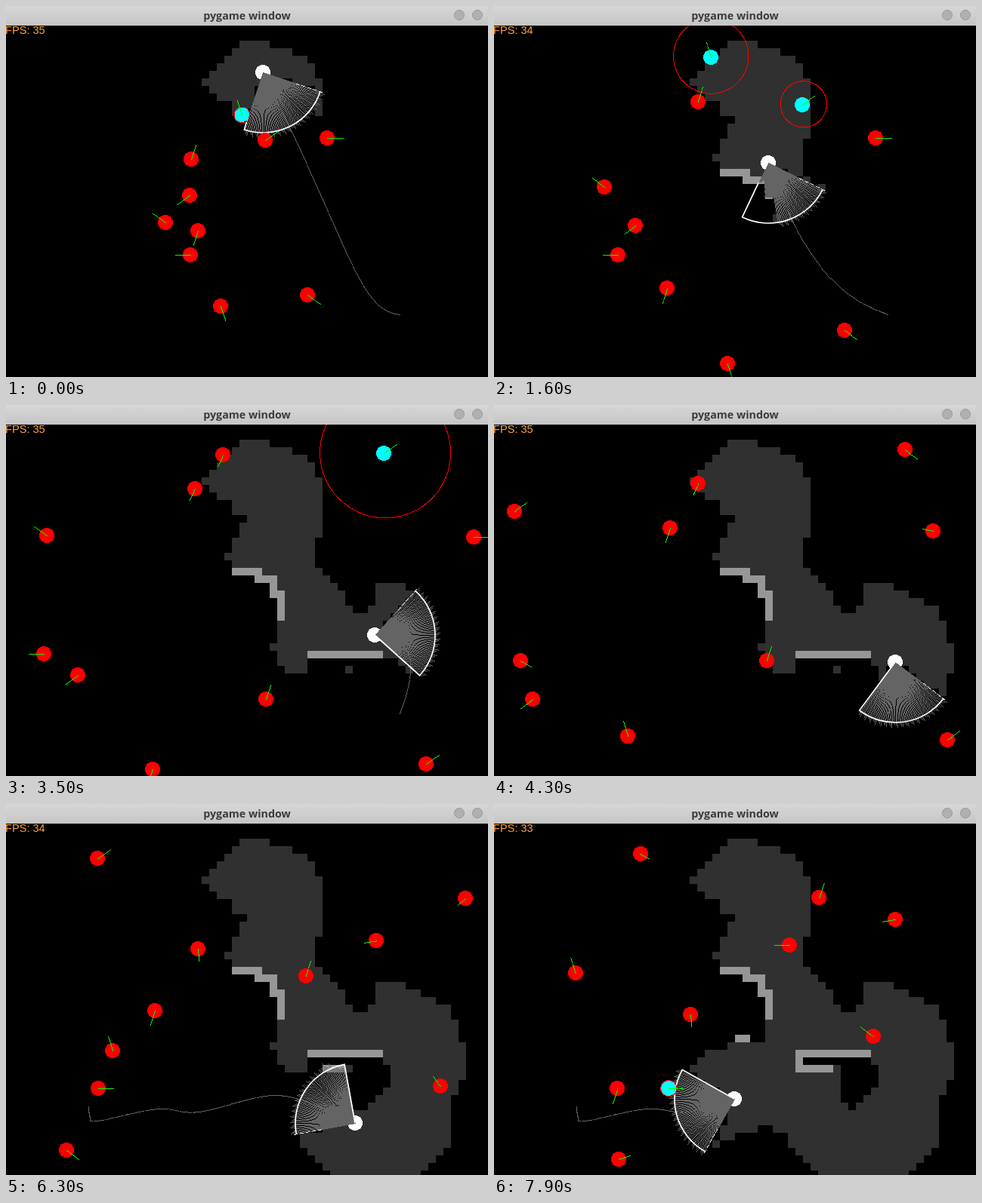
These frames come from a looping animation (638 px wide and 492 px high, 8000 ms). An HTML page with a canvas:

```html
<!DOCTYPE html>
<html lang="en">
<head>
<meta charset="utf-8">
<title>pygame window</title>
<style>
html, body { margin: 0; width: 100%; height: 100%; overflow: hidden; background: #000; }
canvas { position: absolute; left: 0; top: 0; }
#bar {
  position: absolute; left: 0; top: 0; width: 638px; height: 26px;
  background: linear-gradient(#d7d7d7, #c5c5c5);
  font: bold 14.3px/25px "Open Sans", "Noto Sans", sans-serif;
  color: #3c3c3c; text-align: center;
}
#bar i {
  position: absolute; top: 5px; width: 12px; height: 12px;
  border: 1px solid #989898; border-radius: 50%; background: #b0b0b0;
}
#fps {
  position: absolute; left: -1px; top: 24px; white-space: pre;
  font: 14.6px/16px "Liberation Sans", Arial, sans-serif; color: #ffa03c;
}
</style>
</head>
<body>
<canvas id="stage" width="638" height="492"></canvas>
<div id="bar">pygame window<i style="left:593px"></i><i style="left:617px"></i></div>
<div id="fps">FPS: 35</div>
<script>
const ctx = document.getElementById('stage').getContext('2d');
const label = document.getElementById('fps');
const STEP = 100, TICKS = 80, RANGE = 80, HALF = 45, RAYS = 72, RAD = Math.PI / 180;
const AREA = { left: 19, right: 619, top: 46, bottom: 486 };
const FPS = [35, 34, 35, 34, 33];

// Distance a full-speed ball has covered after each number of running ticks.
const PAUSES = [2, 9, 21, 26, 52, 53];
const TRAVEL = [[0, 0], [1, 2], [14, 80], [31, 194], [39, 248], [50, 316], [57, 365], [73, 474]];

// travel, x, y, heading in degrees
const ROBOT = [[0, 340, 88, 63.4], [40, 357, 146, 100], [80, 363, 208, 71], [137, 408, 278, 75],
  [170, 452, 298, 5], [194, 488, 305, -3], [248, 531, 341, 82], [297, 521, 405, 100],
  [316, 513, 425, 125], [365, 462, 423, 214.5], [420, 390, 391, 190], [474, 318, 391, 164.5]];
const GOAL = [521, 409];
const NEXT_ROUTE = [[109, 401], [111, 415], [121, 420], [200, 404], [255, 408], [358, 386], [440, 412], [508, 430]];

// Ball i sets off at 36 * i degrees; a turn gives travel, new heading and speed.
const BALLS = [
  { x: 425, y: 175, turns: [[194, 192, 0.72], [248, 171, 0.79], [414, 180, 1]] },
  { x: 399, y: 383, turns: [[273, -128, 0.77], [408, -143, 1]] },
  { x: 284, y: 398, turns: [] },
  { x: 254, y: 298, turns: [] },
  { x: 243, y: 251, turns: [[0, 144, 0.86], [80, 144, 1], [409, -16, 0.79]] },
  { x: 244, y: 330, turns: [[225, 30, 0.79], [343, 0, 1]], seen: 466, lost: 474 },
  { x: 211, y: 287, turns: [[409, 28, 0.64]] },
  { x: 312, y: 144, turns: [[103, 115, 0.79], [194, 108, 1]], seen: 0, lost: 0 },
  { x: 245, y: 203, turns: [[165, 114, 0.77], [309, 86, 0.8]] },
  { x: 343, y: 178, turns: [[342, 138, 0.67], [405, 170, 0.84]], seen: 8, lost: 39 }
];

// Obstacles on the 10 px grid: column, row, width, height.
const WALLS = [[30, 19, 4, 1], [33, 20, 3, 1], [35, 21, 1, 2], [36, 22, 1, 4],
  [40, 30, 10, 1], [40, 31, 1, 2], [41, 32, 4, 1], [32, 28, 2, 1]];

// Rough border of the mapped floor and of the gap inside it.
const BORDER = [[311, 44], [340, 46], [400, 70], [409, 92], [419, 106], [419, 176], [409, 178], [410, 212],
  [448, 250], [458, 276], [478, 276], [489, 250], [489, 236], [519, 236], [589, 271], [599, 300], [609, 340],
  [609, 366], [599, 368], [590, 398], [589, 446], [550, 493], [429, 493], [389, 456], [388, 436], [354, 428],
  [328, 437], [289, 457], [309, 422], [309, 386], [258, 358], [279, 326], [357, 314], [359, 246], [329, 222],
  [299, 216], [289, 200], [309, 170], [319, 150], [299, 144], [299, 126], [279, 123], [261, 105], [261, 97]];
const GAP = [[409, 336], [499, 336], [509, 346], [509, 366], [470, 408], [459, 386], [459, 356], [449, 346], [409, 346]];

function lerp(table, k) {
  let i = 1;
  while (i < table.length - 1 && table[i][0] < k) i++;
  const a = table[i - 1], b = table[i], u = (k - a[0]) / (b[0] - a[0]);
  return a.slice(1).map((v, j) => v + (b[j + 1] - v) * u);
}

const travelAt = tick => lerp(TRAVEL, tick - PAUSES.filter(p => p <= tick).length)[0];
const polar = (x, y, angle, r) => [x + Math.cos(angle) * r, y + Math.sin(angle) * r];

// --- Map ---

const solid = new Set();
for (const [col, row, w, h] of WALLS) {
  for (let i = 0; i < w * h; i++) solid.add((row + Math.floor(i / w)) * 100 + col + i % w);
}

// How far the scanner reaches in one direction.
function reach(x, y, angle) {
  for (let r = 10; r < RANGE; r += 3) {
    const [px, py] = polar(x, y, angle, r);
    if (solid.has(Math.floor((py - 26) / 10) * 100 + Math.floor((px + 1) / 10))) return r + 5;
  }
  return RANGE;
}

function sees([x, y, heading], cx, cy) {
  const angle = Math.atan2(cy - y, cx - x), dist = Math.hypot(cx - x, cy - y);
  const turn = ((angle / RAD - heading) % 360 + 540) % 360 - 180;
  return Math.abs(turn) < HALF && dist < RANGE + 5 && dist <= reach(x, y, angle) + 5;
}

const poses = Array.from({ length: TICKS }, (_, tick) => lerp(ROBOT, travelAt(tick)));

// Walls show when hit, floor when it leaves the view, missed cells when the robot is closest.
function revealTick(cx, cy, wall) {
  const away = tick => Math.hypot(cx - poses[tick][0], cy - poses[tick][1]);
  let before = sees(poses[0], cx, cy), nearest = 0;
  if (!before && cy < 146 && away(0) < RANGE + 15) return 0;
  for (let tick = 1; tick < TICKS; tick++) {
    const now = sees(poses[tick], cx, cy);
    if (wall ? now : before && !now) return tick;
    before = now;
    if (away(tick) < away(nearest)) nearest = tick;
  }
  return before ? TICKS : nearest;
}

const floor = new Path2D();
for (const shape of [BORDER, GAP]) {
  shape.forEach((p, i) => i ? floor.lineTo(...p) : floor.moveTo(...p));
  floor.closePath();
}

const cells = [];
for (let row = 2; row < 47; row++) {
  for (let col = 25; col < 62; col++) {
    const x = col * 10 - 1, y = row * 10 + 26, wall = solid.has(row * 100 + col);
    if (wall || ctx.isPointInPath(floor, x + 5, y + 5, 'evenodd')) {
      cells.push({ x, y, wall, tick: revealTick(x + 5, y + 5, wall) });
    }
  }
}

// --- Crisp drawing ---

function line(color, [x0, y0], [x1, y1]) {
  const n = Math.max(1, Math.round(Math.max(Math.abs(x1 - x0), Math.abs(y1 - y0))));
  ctx.fillStyle = color;
  for (let i = 0; i <= n; i++) {
    ctx.fillRect(Math.round(x0 + (x1 - x0) * i / n), Math.round(y0 + (y1 - y0) * i / n), 1, 1);
  }
}

function disc(x, y, r, color) {
  ctx.fillStyle = color;
  for (let dy = -r; dy < r; dy++) {
    const half = Math.round(Math.sqrt(r * r - (dy + 0.5) ** 2));
    ctx.fillRect(Math.round(x) - half, Math.round(y) + dy, half * 2, 1);
  }
}

function ring(x, y, r, color) {
  ctx.fillStyle = color;
  for (let a = 0; a < 2 * Math.PI; a += 0.7 / r) {
    const [px, py] = polar(x, y, a, r);
    ctx.fillRect(Math.round(px), Math.round(py), 1, 1);
  }
}

// A cubic curve, drawn as short straight pieces.
function bezier(a, b, c, d) {
  const at = t => [0, 1].map(k => a[k] * (1 - t) ** 3 + 3 * b[k] * t * (1 - t) ** 2
    + 3 * c[k] * t * t * (1 - t) + d[k] * t ** 3);
  for (let i = 0; i < 20; i++) line('#646464', at(i / 20), at((i + 1) / 20));
}

function spline(pts) {
  const at = i => pts[Math.max(0, Math.min(pts.length - 1, i))];
  const offset = (p, from, to, k) => [p[0] + (to[0] - from[0]) * k, p[1] + (to[1] - from[1]) * k];
  for (let i = 0; i < pts.length - 1; i++) {
    const [a, b, c, d] = [at(i - 1), at(i), at(i + 1), at(i + 2)];
    bezier(b, offset(b, a, c, 1 / 6), offset(c, b, d, -1 / 6), c);
  }
}

// --- Scene ---

function drawRoute(s, [x, y, heading]) {
  if (s > 297) {
    spline([...NEXT_ROUTE.filter(p => p[0] < x - 15), [x, y]]);
    return;
  }
  // Leave along the heading and swing round towards the goal.
  const dist = Math.hypot(GOAL[0] - x, GOAL[1] - y);
  const arrive = Math.min(110, 5 + s * s * 0.0028) * RAD;
  bezier([x, y], polar(x, y, heading * RAD, dist * 0.7), polar(...GOAL, arrive, -dist * 0.15), GOAL);
}

function drawView(s, [x, y, heading]) {
  const low = (heading - HALF) * RAD, high = (heading + HALF) * RAD;
  for (let i = 0; i <= RAYS; i++) {
    const a = low + (high - low) * i / RAYS, r = reach(x, y, a);
    line('#646464', [x, y], polar(x, y, a, r < RANGE ? r : r + i * 7 % 4 * 2));
  }
  ctx.strokeStyle = '#fff';
  ctx.lineWidth = 1.7;
  ctx.beginPath();
  ctx.arc(x + 0.5, y + 0.5, RANGE - 0.5, low, high);
  ctx.lineTo(...polar(x, y, high, Math.max(0, 62 - s * 0.4)));
  ctx.stroke();
  for (let r = 46; r < RANGE; r += 8) line('#fff', polar(x, y, low, r), polar(x, y, low, r + 4));
}

// Run a ball from its start, bouncing off the sides.
function ballAt({ x, y, turns }, i, s) {
  let heading = 36 * i * RAD, speed = 1;
  for (let k = 0; k < s; k++) {
    const turn = turns.find(t => t[0] === k);
    if (turn) [heading, speed] = [turn[1] * RAD, turn[2]];
    const step = Math.min(1, s - k) * speed, dx = Math.cos(heading), dy = Math.sin(heading);
    x += dx * step;
    y += dy * step;
    if (x < AREA.left && dx < 0 || x > AREA.right && dx > 0) heading = Math.PI - heading;
    if (y < AREA.top && dy < 0 || y > AREA.bottom && dy > 0) heading = -heading;
  }
  return { x, y, heading, speed };
}

function drawBall(ball, i, s) {
  const { x, y, heading, speed } = ballAt(ball, i, s);
  const radius = 10.5 + Math.max(0, s - ball.lost) * 0.49;
  const tracked = s >= ball.seen && radius < 100;
  disc(x, y, 10, tracked ? '#0ff' : '#f00');
  if (tracked) ring(...polar(x, y, heading, s > ball.lost ? 2 : 0), radius, '#f00');
  line('#0f0', [x, y], polar(x, y, heading, 20.5 * speed));
}

function draw(tick) {
  const s = travelAt(tick), robot = poses[tick];
  ctx.fillStyle = '#000';
  ctx.fillRect(0, 0, 638, 492);
  for (const c of cells) {
    if (c.tick > tick) continue;
    ctx.fillStyle = c.wall ? '#969696' : '#303030';
    ctx.fillRect(c.x, c.y, 10, 10);
  }
  drawRoute(s, robot);
  disc(robot[0], robot[1], 10, '#fff');
  drawView(s, robot);
  BALLS.forEach((ball, i) => drawBall(ball, i, s));
  label.textContent = 'FPS: ' + FPS[Math.floor(tick / 16)];
}

const start = performance.now();
let shown = -1;
function loop() {
  const tick = Math.floor((performance.now() - start) / STEP) % TICKS;
  if (tick !== shown) draw(shown = tick);
  requestAnimationFrame(loop);
}
loop();
</script>
</body>
</html>
```
